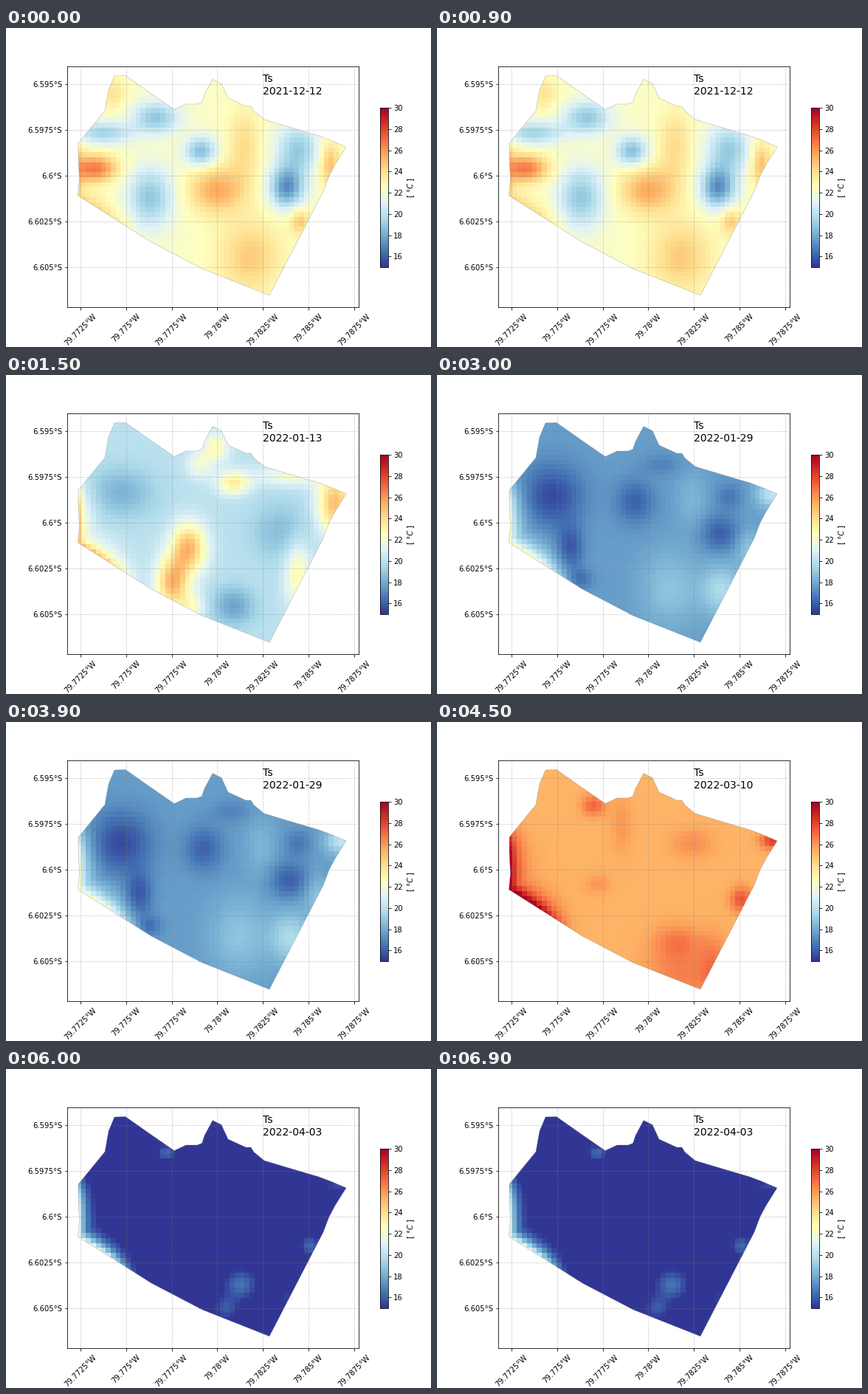
A matplotlib script that plays this animation: 576x432 px, repeating every 7500 ms.

```python
import numpy as np
import matplotlib.pyplot as plt
from matplotlib.animation import FuncAnimation
from matplotlib.patches import Polygon

W, H, DPI = 576, 432, 72
LEFT, RIGHT, TOP, BOTTOM = 83, 478, 52, 378
CELL, X0, Y0, COLS, ROWS = 6.7, 95, 62, 56, 46
STEP = 61.8

OUTLINE = [
    (98, 156), (134, 112), (139, 84), (147, 65), (162, 64.5), (194, 87),
    (228, 110.5), (244, 103), (259, 103), (265.5, 100.5), (269, 90),
    (280, 69.5), (292, 75.5), (301, 95), (325, 106), (332, 106),
    (336, 112.5), (350, 124), (385, 134.5), (424, 146), (440, 152),
    (461, 161), (446, 185), (438, 200), (430, 221), (357, 362),
    (266, 326), (197, 290), (97.5, 227), (99.5, 205), (98, 175),
]

gx, gy = np.meshgrid(X0 + CELL * (np.arange(COLS) + 0.5),
                     Y0 + CELL * (np.arange(ROWS) + 0.5))


def rim():
    """Warm band along the west and south-west edges, strongest at the corner."""
    dx, dy = gx - 97.5, gy - 227
    depth = np.maximum(np.minimum(dx, 0.535 * dx - 0.845 * dy), 0)
    return np.exp(-depth / 13 - (np.hypot(dx, dy) / 80) ** 4)


def field(base, edge, *spots):
    """Base temperature, edge warming and soft spots (x, y, rx, ry, degrees)."""
    temps = base + edge * rim()
    for x, y, rx, ry, amp in spots:
        temps += amp * np.exp(-((gx - x) / rx) ** 2 - ((gy - y) / ry) ** 2)
    return temps


def place(x0, x1, y0, y1):
    return [x0 / W, 1 - y1 / H, (x1 - x0) / W, (y1 - y0) / H]


SCENES = [
    ("2021-12-12", field(
        22.3, 2,
        (122, 191, 30, 18, 4.2), (145, 90, 18, 22, 1.5), (130, 143, 40, 16, -3),
        (203, 122, 32, 22, -3.4), (264, 168, 22, 20, -3.8),
        (195, 230, 32, 42, -3.4), (285, 220, 38, 32, 3.2),
        (322, 160, 22, 50, 1.8), (395, 165, 30, 34, -3.2),
        (380, 217, 24, 28, -5), (438, 185, 14, 32, 2.8),
        (398, 262, 14, 18, 2.4), (330, 310, 42, 50, 2.3))),
    ("2022-01-13", field(
        20, 5,
        (155, 160, 46, 34, -1.7), (225, 282, 22, 34, 5.2),
        (247, 235, 24, 34, 5.2), (250, 315, 18, 20, 2.2),
        (262, 122, 18, 20, 1.8), (285, 98, 18, 20, 2.6),
        (308, 147, 22, 16, 3.4), (445, 175, 24, 42, 5),
        (385, 138, 45, 14, 2), (372, 212, 40, 40, -1.4),
        (308, 313, 28, 26, -2.2), (395, 270, 18, 45, 2.8))),
    ("2022-01-29", field(
        17.6, 5,
        (155, 165, 42, 42, -2.1), (180, 235, 18, 30, -1.8),
        (195, 277, 16, 14, -1.2), (268, 172, 26, 30, -1.5),
        (305, 122, 26, 14, -0.7), (345, 170, 20, 40, 0.7),
        (395, 165, 18, 18, -1), (383, 215, 26, 24, -1.6),
        (455, 162, 22, 18, 2.6), (420, 235, 16, 26, 1.2),
        (385, 292, 28, 34, 2), (315, 290, 38, 50, 1.2))),
    ("2022-03-10", field(
        25.3, 5.5,
        (212, 114, 16, 14, 1.9), (250, 140, 14, 40, 0.7),
        (218, 220, 18, 14, 0.7), (345, 165, 28, 20, 0.9),
        (456, 161, 18, 12, 3), (412, 241, 15, 17, 2.3),
        (325, 300, 34, 24, 1.5), (330, 345, 50, 30, 1.2),
        (375, 330, 20, 40, 1.3))),
    ("2022-04-03", field(
        14, 7.5,
        (217, 114, 14, 12, 2.3), (318, 292, 24, 22, 2.5),
        (297, 325, 18, 18, 1.8), (412, 240, 15, 15, 2.3),
        (380, 310, 15, 25, 1.2), (448, 157, 18, 8, 1.6))),
]

plt.rcParams.update({"font.family": "DejaVu Sans", "font.size": 10})
fig = plt.figure(figsize=(W / DPI, H / DPI), dpi=DPI, facecolor="white")
ax = fig.add_axes(place(LEFT, RIGHT, TOP, BOTTOM))

image = ax.imshow(SCENES[0][1], cmap="RdYlBu_r", vmin=15, vmax=30,
                  extent=(X0, X0 + COLS * CELL, Y0 + ROWS * CELL, Y0),
                  interpolation="nearest", aspect="auto", zorder=1)
ax.set(xlim=(LEFT, RIGHT), ylim=(BOTTOM, TOP))
border = Polygon(OUTLINE, fill=False, ec="gray", lw=0.3, zorder=2)
ax.add_patch(border)
image.set_clip_path(border)

ax.set_xticks([100.9 + STEP * i for i in range(7)],
              [f"{79.7725 + 0.0025 * i:g}°W" for i in range(7)], rotation=45)
ax.set_yticks([76.3 + STEP * i for i in range(5)],
              [f"{6.595 + 0.0025 * i:g}°S" for i in range(5)])
ax.set_axisbelow(False)
ax.grid(color="gray", alpha=0.6, ls=":", lw=1)

label = ax.text(348, 89.5, "", fontsize=14, va="baseline", zorder=5)

bar = fig.colorbar(image, cax=fig.add_axes(place(507.2, 518, 108, 323.7)),
                   ticks=range(16, 31, 2))
bar.set_label(r"[ $\degree C$ ]")


def update(i):
    date, temps = SCENES[i]
    image.set_data(temps)
    label.set_text("Ts\n" + date)
    return image, label


anim = FuncAnimation(fig, update, frames=len(SCENES), interval=1500,
                     repeat=True, repeat_delay=0)
plt.show()
```
